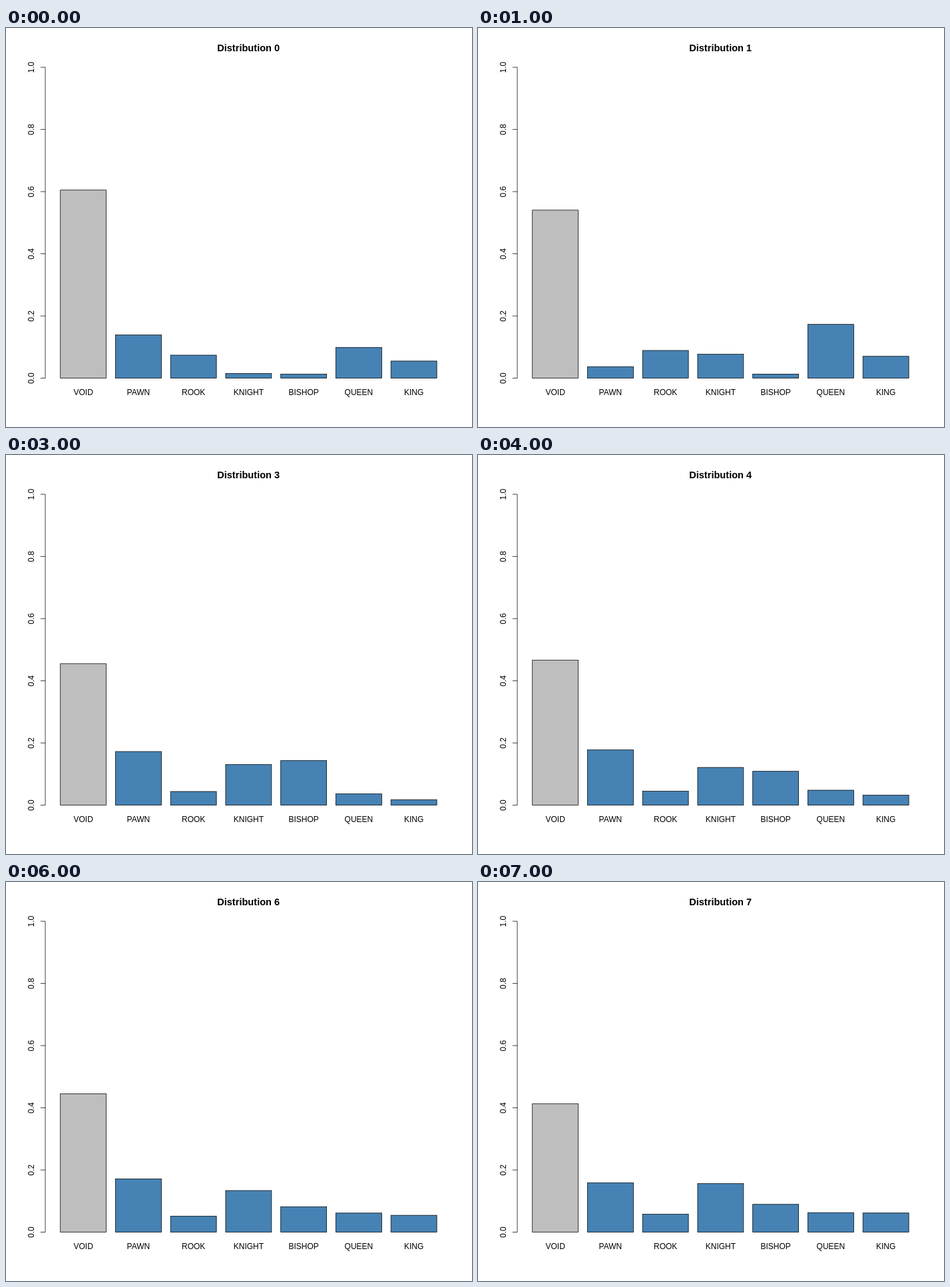
Animation, 700 px wide and 600 px high, one loop 8000 ms. Source, as an HTML page:

```html
<!DOCTYPE html>
<html lang="en">
<head>
<meta charset="utf-8">
<title>Distribution</title>
<style>
  html, body { margin: 0; width: 100%; height: 100%; overflow: hidden; background: #fff; }
  svg { display: block; }
  text { font: 12px "Liberation Sans", Arial, sans-serif; text-anchor: middle; }
  #title { font-size: 14.6px; font-weight: bold; }
  line, rect { stroke: #000; stroke-width: .75; }
</style>
</head>
<body>
<svg id="chart" width="700" height="600" viewBox="0 0 700 600">
  <text id="title" x="364.2" y="35"></text>
</svg>
<script>
const STEP = 1000, COUNT = 8;
const TOP = 59.04, BASE = 526.56, AXIS = 59.04;
const LEFT = 81.66, BAR = 68.96, PITCH = BAR * 1.2;
const names = ["VOID", "PAWN", "ROOK", "KNIGHT", "BISHOP", "QUEEN", "KING"];

// Key shares of the six pieces; VOID takes what is left of 1.
const keys = {
  0: [.139, .074, .015, .013, .099, .055],
  1: [.037, .089, .077, .0132, .173, .0703],
  2: [.143, .0588, .088, .039, .1025, .068],
  3: [.1724, .044, .131, .1436, .0363, .0177],
  5: [.184, .0456, .1114, .0742, .0602, .047],
  7: [.159, .0577, .1563, .0895, .0628, .0617]
};

const chart = document.getElementById("chart");
const title = document.getElementById("title");

function add(tag, attrs, text = "") {
  const el = document.createElementNS("http://www.w3.org/2000/svg", tag);
  for (const key in attrs) el.setAttribute(key, attrs[key]);
  el.textContent = text;
  return chart.appendChild(el);
}

const yOf = share => BASE - share * (BASE - TOP);

// A step without a key lies halfway between its neighbours.
function sharesAt(n) {
  const pieces = keys[n] || keys[n - 1].map((v, i) => (v + keys[n + 1][i]) / 2);
  return [1 - pieces.reduce((a, b) => a + b), ...pieces];
}

add("line", { x1: AXIS, y1: TOP, x2: AXIS, y2: BASE });
for (let i = 0; i <= 5; i++) {
  const y = yOf(i / 5);
  add("line", { x1: AXIS - 7.2, y1: y, x2: AXIS, y2: y });
  add("text", { transform: `translate(42 ${y}) rotate(-90)` }, (i / 5).toFixed(1));
}

const bars = names.map((name, i) => {
  const x = LEFT + i * PITCH;
  add("text", { x: x + BAR / 2, y: 552 }, name);
  return add("rect", { x, width: BAR, fill: i ? "#4682b4" : "#bebebe" });
});

function draw(time) {
  const n = Math.floor(time / STEP) % COUNT;
  const shares = sharesAt(n);
  title.textContent = "Distribution " + n;
  bars.forEach((bar, i) => {
    const y = yOf(shares[i]);
    bar.setAttribute("y", y);
    bar.setAttribute("height", BASE - y);
  });
}

const start = performance.now();
function tick() {
  draw(performance.now() - start);
  requestAnimationFrame(tick);
}
tick();
</script>
</body>
</html>
```
